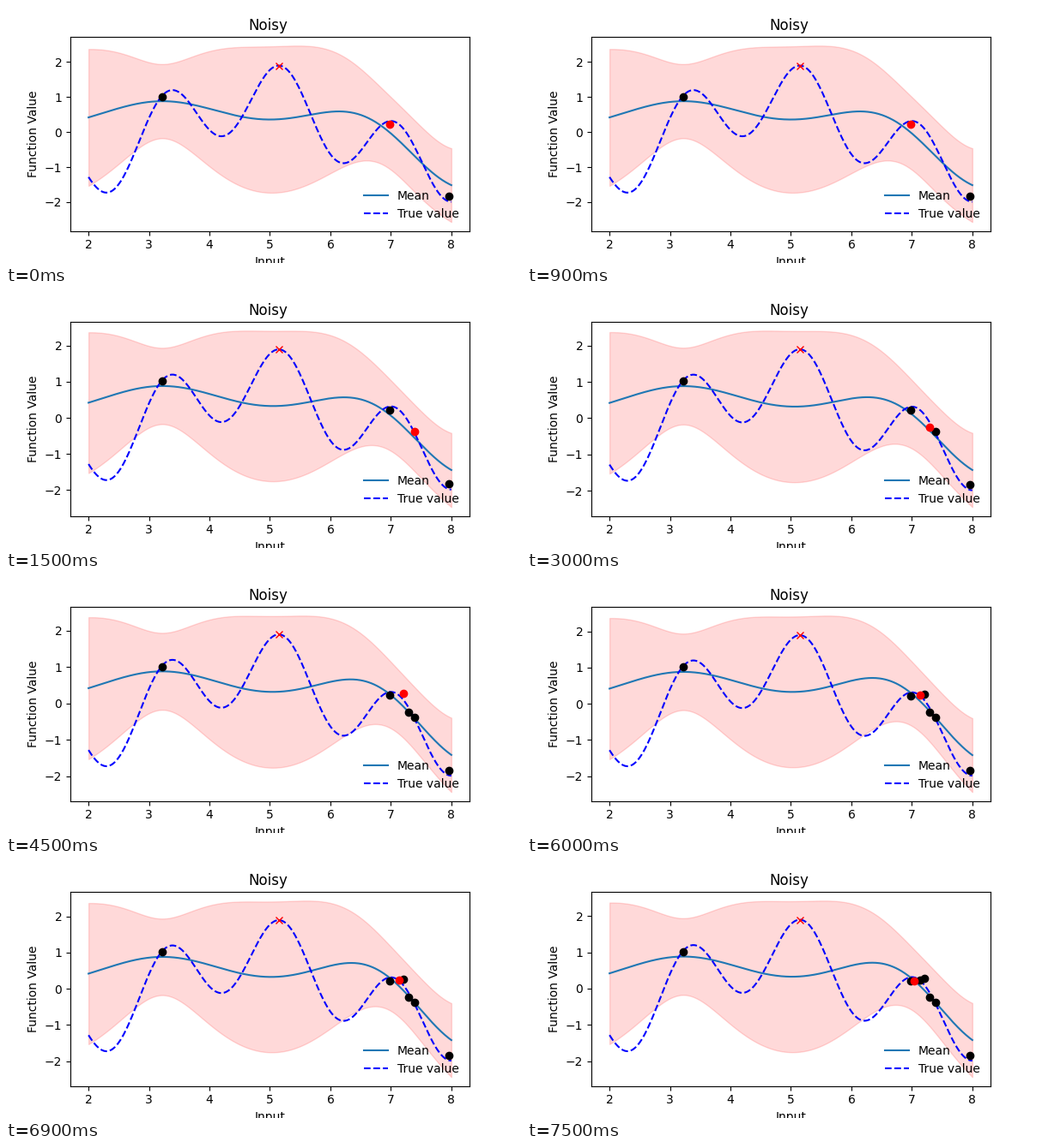
Write a matplotlib script that moves like this. It is 600 by 300 pixels and loops after 8 s.

```python
import matplotlib.pyplot as plt
import numpy as np
from matplotlib.animation import FuncAnimation

plt.rcParams["font.family"] = "DejaVu Sans"

NOISE = 0.15
START = 3          # samples known in the first step
HOLD = 3           # animation frames per step
FRAMES = 16
INTERVAL = 500

X = np.array([3.219, 7.963, 6.973, 7.385, 7.297, 7.207, 7.130, 7.037])
Y = np.array([1.015, -1.840, 0.220, -0.380, -0.240, 0.270, 0.235, 0.220])
grid = np.linspace(2, 8, 400)


def true_value(x):
    return -np.sin(x) - np.sin(10 * x / 3)


def kernel(a, b):
    return np.exp(-0.5 * (a[:, None] - b[None, :]) ** 2)


def posterior(x, y):
    """Mean and standard deviation of the noisy Gaussian process on the grid."""
    cov = kernel(x, x) + NOISE * np.eye(len(x))
    cross = kernel(grid, x)
    mean = cross @ np.linalg.solve(cov, y)
    var = 1 + NOISE - np.sum(cross * np.linalg.solve(cov, cross.T).T, axis=1)
    return mean, np.sqrt(var)


fig = plt.figure(figsize=(6, 3), dpi=100)
fig.subplots_adjust(left=0.125, right=0.9, bottom=0.125, top=0.88)
ax = fig.add_subplot()
truth = true_value(grid)
best = grid[np.argmax(truth)]


def draw(frame):
    n = START + frame // HOLD
    x, y = X[:n], Y[:n]
    mean, std = posterior(x, y)

    ax.clear()
    ax.fill_between(grid, mean - 2 * std, mean + 2 * std, color="red", alpha=0.15)
    ax.plot(grid, mean, label="Mean")
    ax.plot(grid, truth, "b--", label="True value")
    ax.plot(x[:-1], y[:-1], "ko")
    ax.plot(x[-1], y[-1], "ro")
    ax.plot(best, true_value(best), "rx")
    ax.set_title("Noisy", x=0.4946)
    ax.set_xlabel("Input")
    ax.set_ylabel("Function Value")
    ax.legend(loc="lower right", frameon=False)


anim = FuncAnimation(fig, draw, frames=FRAMES, init_func=lambda: draw(0),
                     interval=INTERVAL, repeat=True, repeat_delay=0)
plt.show()
```
